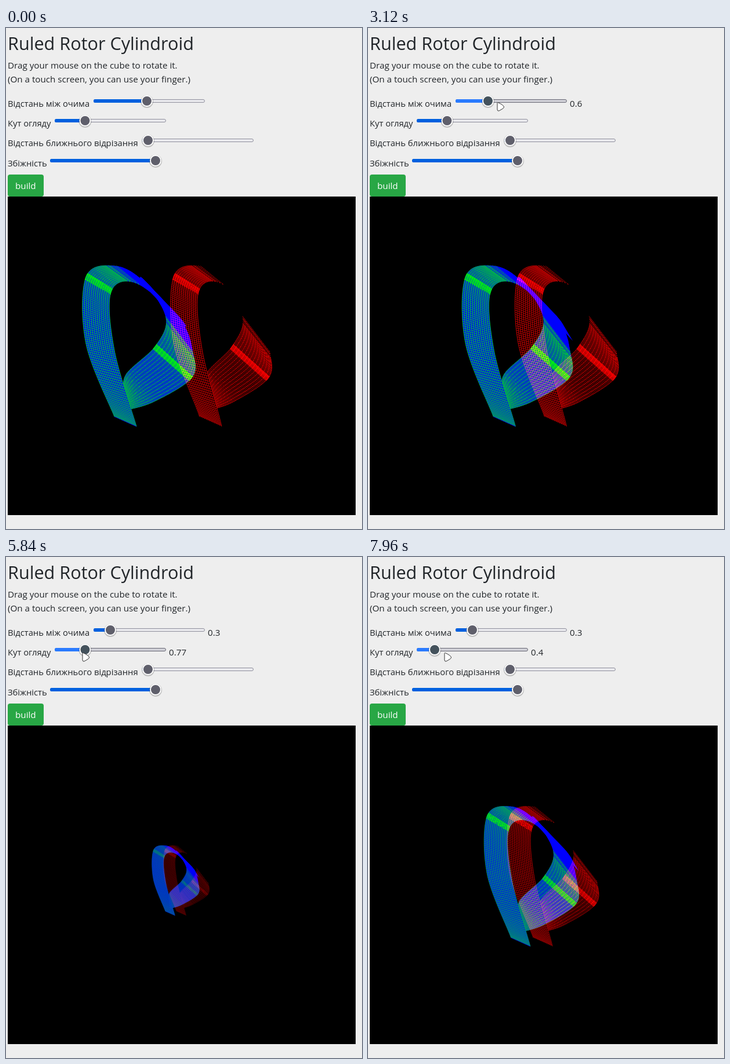
Animation, 614 px wide and 865 px high, one loop 8000 ms. Source, as an HTML page with a canvas:

```html
<!DOCTYPE html>
<html lang="uk">
<head>
<meta charset="utf-8">
<title>Ruled Rotor Cylindroid</title>
<style>
  html, body { margin: 0; width: 100%; height: 100%; overflow: hidden; background: #eee; }
  canvas { position: absolute; left: 3px; top: 291px; }
  svg { position: absolute; left: 0; top: 0; font: 15.2px "Open Sans", "Noto Sans", sans-serif; fill: #212529; }
  .label { font-size: 14.75px; }
</style>
</head>
<body>
<canvas id="view" width="600" height="550"></canvas>
<svg id="ui" width="614" height="865">
  <text x="3" y="38" font-size="30.6">Ruled Rotor Cylindroid</text>
  <text x="3" y="70">Drag your mouse on the cube to rotate it.</text>
  <text x="3" y="94">(On a touch screen, you can use your finger.)</text>
  <rect x="3" y="253" width="62" height="38" rx="4" fill="#28a745"/>
  <text x="16" y="278" fill="#fff">build</text>
  <g id="sliders"></g>
  <path id="cursor" d="M1 1.5Q1 0 2.6.8Q11 4.500 12.500 8Q13 9.500 10 11.500L4 15Q1.500 16 1 13Z" fill="#fff" stroke="#333"/>
  <circle id="press" r="12" fill="#f4f43c" opacity=".5"/>
</svg>
<script>
const $ = id => document.getElementById(id);
const LOOP = 8000, SLICES = 270, ACROSS = 13;

// Key cross-sections of the band: ends of the ruling on both edges
const RIBS = [
  [187, 671, 225, 688], [138, 545, 187, 557], [138, 430, 181, 456],
  [188, 411, 226, 441], [237, 438, 301, 506], [276, 500, 322, 560],
  [258, 549, 320, 604], [208, 597, 255, 645], [203, 630, 206, 660]
];
const SLIDERS = [
  { x: 151, y: 126, label: 'Відстань між очима' },
  { x: 84, y: 160, label: 'Кут огляду' },
  { x: 235, y: 194, label: 'Відстань ближнього відрізання' },
  { x: 76, y: 229, label: 'Збіжність' }
];
// Motion as [time, value...] with straight runs between
const EYES = [[1860, 1], [2060, .8], [2480, .78], [2790, .4], [2850, .42],
  [3320, .8], [3520, .72], [3650, .54], [4050, .3]];
const FOV = [[5840, .77], [6560, .59], [6830, .59], [7300, .33], [7650, .33], [7690, .42], [7960, .4]];
const PATH = [[130, 568, 850], [760, 262, 229], [930, 244, 124], [1390, 241, 125], [1790, 222, 128],
  [4380, 222, 128], [4450, 224, 134], [4720, 240, 198], [5050, 131, 165]];

const mix = (a, b, f) => a + (b - a) * f;
const clamp = (x, lo, hi) => Math.max(lo, Math.min(hi, x));

function along(keys, t) {
  const i = clamp(keys.findIndex(k => k[0] > t), 0, keys.length);
  if (t >= keys[keys.length - 1][0]) return keys[keys.length - 1].slice(1);
  if (i === 0) return keys[0].slice(1);
  const p = keys[i - 1], q = keys[i], f = (t - p[0]) / (q[0] - p[0]);
  return p.slice(1).map((v, c) => mix(v, q[c + 1], f));
}

function ribAt(u) {
  const i = Math.min(Math.floor(u), RIBS.length - 2), f = u - i;
  const [p, q, r, s] = [-1, 0, 1, 2].map(d => RIBS[clamp(i + d, 0, RIBS.length - 1)]);
  return q.map((b, c) => b + f / 2 * (r[c] - p[c]
    + f * (2 * p[c] - 5 * b + 4 * r[c] - s[c] + f * (3 * (b - r[c]) + s[c] - p[c]))));
}
const uOf = k => k / SLICES * (RIBS.length - 1);
const slices = Array.from({ length: SLICES + 1 }, (_, k) => ribAt(uOf(k)));
const parallax = u => 142 + 10 * Math.cos((u - 1.4) * .76);

const main = $('view').getContext('2d');
const layer = document.createElement('canvas');
layer.width = 600; layer.height = 550;
const second = layer.getContext('2d');

// Lines vanish where the band is seen edge-on
const lineShare = u => clamp((Math.abs(u - 3.95) - .8) / .5, 0, 1);

function drawBand(g, side, eyes, scale, fill, line) {
  g.globalCompositeOperation = 'source-over';
  g.fillStyle = '#000';
  g.fillRect(0, 0, 600, 550);
  const ends = slices.map(([ax, ay, bx, by], k) => {
    const p = parallax(uOf(k)), shift = p / 2 * (1 + side * eyes) - 303;
    const place = (x, y) => [300 + scale * (x + shift), 275 + scale * (y - 566)];
    return [place(ax, ay), place(bx, by)];
  });
  const point = (k, j) => {
    const [a, b] = ends[k], f = j / ACROSS;
    return [mix(a[0], b[0], f), mix(a[1], b[1], f)];
  };
  const trace = (from, to) => { g.moveTo(...from); g.lineTo(...to); };
  for (let k = SLICES - 1; k >= 0; k--) {
    const u = uOf(k);
    g.fillStyle = g.strokeStyle = fill;
    g.lineWidth = (Math.abs(u - 4) < .15 ? 6 : .8) * scale;
    g.beginPath();
    g.moveTo(...ends[k][0]);
    g.lineTo(...ends[k][1]);
    g.lineTo(...ends[k + 1][1]);
    g.lineTo(...ends[k + 1][0]);
    g.closePath();
    g.fill();
    g.stroke();

    if ((k * .618) % 1 >= lineShare(u)) continue;
    const streak = Math.abs(Math.abs(u - 4) - 2) < .1;
    g.strokeStyle = line;
    g.lineWidth = (streak ? 1.4 : .75) * scale ** 1.5;
    g.beginPath();
    trace(...ends[k + 1]);
    for (let j = 0; j <= ACROSS; j++) trace(point(k, j), point(k + 1, j));
    g.stroke();
  }
}

let shown = '';
function drawScene(eyes, scale) {
  const key = eyes + '/' + scale;
  if (key === shown) return;
  shown = key;
  drawBand(main, -1, eyes, scale, '#00f', '#0f0');
  drawBand(second, 1, eyes, scale, '#000', '#f00');
  main.globalCompositeOperation = 'lighter';
  main.drawImage(layer, 0, 0);
}

$('sliders').innerHTML = SLIDERS.map(({ x, y, label }) => `
  <text class="label" x="3" y="${y + 9.5}">${label}</text>
  <g>
    <rect x="${x + .5}" y="${y - 2.5}" width="191" height="5" rx="2.5"/>
    <rect x="${x}" y="${y - 3}" height="6" rx="2.5"/>
    <circle cy="${y + 1}" r="11" fill="#000" opacity=".2"/>
    <circle cy="${y}" r="9" stroke="#fff" stroke-width="2"/>
    <text x="${x + 197}" y="${y + 10}"></text>
  </g>`).join('');
const parts = [...document.querySelectorAll('#sliders > g')].map(g => [...g.children]);

function setSlider(i, thumb, value, hot, held) {
  const [track, bar, shadow, knob, text] = parts[i];
  track.setAttribute('fill', hot ? '#d0d0d7' : '#e9e9ed');
  track.setAttribute('stroke', hot ? '#676774' : '#8f8f9d');
  bar.setAttribute('fill', hot ? '#2a7bff' : '#0060df');
  bar.setAttribute('width', thumb - SLIDERS[i].x);
  shadow.setAttribute('cx', thumb);
  knob.setAttribute('cx', thumb);
  knob.setAttribute('fill', held ? '#44525c' : '#5f5f6b');
  text.textContent = value;
}

function frame(now) {
  const t = now % LOOP;
  const eyes = Math.round(along(EYES, t)[0] * 10) / 10;
  const fov = Math.round(along(FOV, t)[0] * 100) / 100;
  const [x, y] = along(PATH, t);
  const eyesSet = t >= 1930, fovSet = t >= 5370;
  drawScene(eyesSet ? eyes : 1, fovSet ? .1764 / Math.tan(fov / 2) : 1);

  const held = t >= 1190 && t < 4500 ? 0 : t >= 5310 ? 1 : -1;
  const over = held >= 0 ? held
    : SLIDERS.findIndex(s => Math.abs(y - s.y) < 10 && x > s.x && x < s.x + 192);
  const thumbs = [eyesSet ? 153 + 90 * eyes : Math.min(243, x - 1), 115 + (fov - .4) * 57.9, 245, 258];
  const values = [eyesSet ? eyes : '', fovSet ? fov : '', '', ''];
  thumbs.forEach((at, i) => setSlider(i, at, values[i], i === over, i === held));

  const pressed = (t >= 1190 && t < 1930) || (t >= 5310 && t < 5840);
  $('cursor').style.display = t >= 130 ? '' : 'none';
  $('press').style.display = pressed ? '' : 'none';
  for (const id of ['cursor', 'press']) $(id).setAttribute('transform', `translate(${x} ${y})`);
  requestAnimationFrame(frame);
}
requestAnimationFrame(frame);
</script>
</body>
</html>
```
